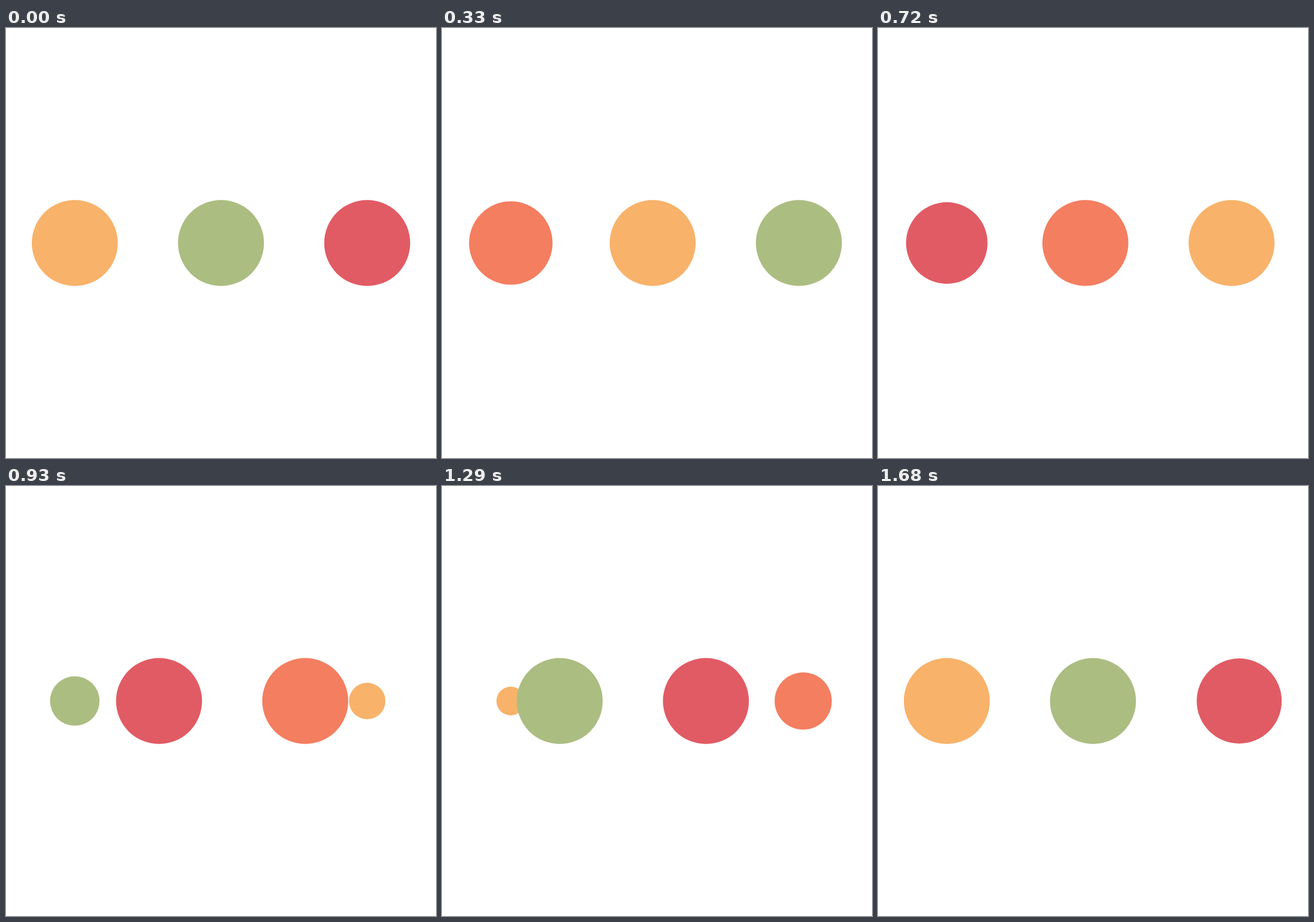
Recreate the animation shown at these times as an HTML page with a canvas. Size 748 px wide and 748 px high, loop 1.71 s.

```html
<!DOCTYPE html>
<html lang="en">
<head>
<meta charset="utf-8">
<title>Four dots</title>
<style>
  html, body { margin: 0; width: 100%; height: 100%; overflow: hidden; background: #fff; }
  canvas { display: block; width: 748px; height: 748px; }
</style>
</head>
<body>
<canvas id="stage" width="748" height="748"></canvas>
<script>
const ctx = document.getElementById('stage').getContext('2d');
const SIZE = 748, RADIUS = SIZE * 0.1;
const LEFT = SIZE * 0.16, GAP = SIZE * 0.34;
const TICK = 30, TICKS = 57, STEP = 14;
const DRIFT = 2.3e-5; // the shrinking dot runs a hair ahead on each step

// Stacking order, bottom to top
const COLORS = ['#e15b64', '#f47e60', '#f8b26a', '#abbd81'];

// cubic-bezier(0, 0.5, 0.5, 1)
function ease(x) {
  let lo = 0, hi = 1;
  for (let i = 0; i < 40; i++) {
    const s = (lo + hi) / 2;
    if (1.5 * s * s - 0.5 * s * s * s < x) lo = s; else hi = s;
  }
  return 1.5 * lo - 0.5 * lo * lo * lo;
}

function dot(color, slot, scale) {
  if (scale < 1e-4) return;
  ctx.fillStyle = color;
  ctx.beginPath();
  ctx.arc(LEFT + GAP * slot, SIZE / 2, RADIUS * scale, 0, Math.PI * 2);
  ctx.fill();
}

function draw(tick) {
  const turn = Math.floor(tick / STEP);
  const x = (tick % STEP) / STEP;
  const p = ease(x);

  ctx.fillStyle = '#fff';
  ctx.fillRect(0, 0, SIZE, SIZE);

  dot(COLORS[(4 - turn % 4) % 4], 2, 1 - ease(Math.min(1, x + turn * DRIFT)));

  COLORS.forEach((color, i) => {
    const stage = (turn + i) % 4; // 0 hidden, 1 growing, 2 and 3 sliding
    if (stage === 1) dot(color, 0, p);
    if (stage > 1) dot(color, stage - 2 + p, 1);
  });
}

const start = performance.now();
function loop(now) {
  draw(Math.floor(Math.max(0, now - start) / TICK) % TICKS);
  requestAnimationFrame(loop);
}
draw(0);
requestAnimationFrame(loop);
</script>
</body>
</html>
```
